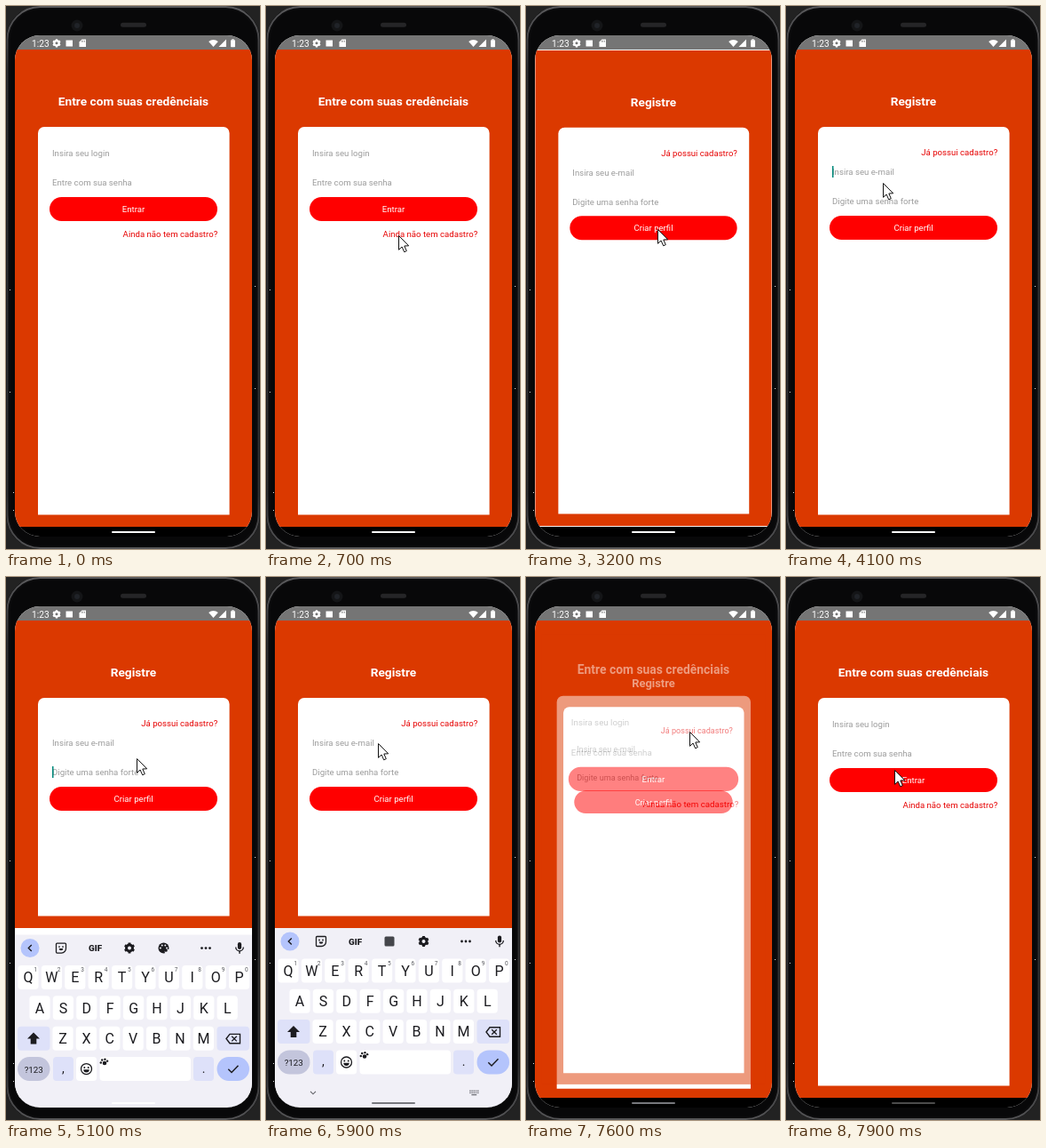
An HTML page with a canvas that plays this animation: 286 px wide and 611 px high, repeating every 8000 ms.

```html
<!DOCTYPE html>
<html lang="pt-BR">
<head>
<meta charset="utf-8">
<title>Login e cadastro</title>
<style>
html, body { margin: 0; width: 100%; height: 100%; overflow: hidden; background: #222; }
canvas { display: block; width: 286px; height: 611px; }
</style>
</head>
<body>
<canvas id="stage"></canvas>
<script>
const W = 286, H = 611, LOOP = 8000, STEP = 100;
const FONT = 'Roboto, "Open Sans", sans-serif';
const ORANGE = '#db3900', RED = '#ff0000', LINK = '#e60000', INK = '#1c1c20';
const BLUE = '#b4c4fc', LILAC = '#dee1f9', KEYBOARD = '#f1f0f7';
const SCREEN = { x: 10, y: 33, w: 267, h: 564, r: 28 };
const TOP = 49, BOTTOM = 586, IME_TOP = 395;
const CX = SCREEN.x + SCREEN.w / 2, CY = (TOP + BOTTOM) / 2;
const dpr = window.devicePixelRatio || 1;

function surface(el) {
  el.width = Math.round(W * dpr);
  el.height = Math.round(H * dpr);
  const c = el.getContext('2d');
  c.scale(dpr, dpr);
  return c;
}
const main = surface(document.getElementById('stage'));
const layerEl = document.createElement('canvas');
const layer = surface(layerEl);
let g = main;

const clamp = v => Math.max(0, Math.min(1, v));
const mix = (a, b, u) => a + (b - a) * u;
const easeOut = u => 1 - (1 - clamp(u)) ** 2;
const smooth = u => u * u * (3 - 2 * u);

function fill(color) { g.fillStyle = color; g.fill(); }
function stroke(color, width) { g.strokeStyle = color; g.lineWidth = width; g.stroke(); }
function rect(x, y, w, h, color) { g.fillStyle = color; g.fillRect(x, y, w, h); }
function box(x, y, w, h, r) { g.beginPath(); g.roundRect(x, y, w, h, r); }
function round(x, y, w, h, r, color) { box(x, y, w, h, r); fill(color); }
function arc(x, y, r, a = 0, b = Math.PI * 2) { g.beginPath(); g.arc(x, y, r, a, b); }
function dot(x, y, r, color) { arc(x, y, r); fill(color); }
function trace(...pts) {
  g.beginPath();
  for (let i = 0; i < pts.length; i += 2) g.lineTo(pts[i], pts[i + 1]);
}
function text(s, x, y, size, color, align = 'left', weight = 400) {
  g.font = `${weight} ${size}px ${FONT}`;
  g.textAlign = align;
  g.fillStyle = color;
  g.fillText(s, x, y);
}
// Calls fn with n points spread along an arc.
function fan(n, x, y, r, from, to, fn) {
  for (let i = 0; i < n; i++) {
    const a = mix(from, to, i / (n - 1));
    fn(x + r * Math.cos(a), y + r * Math.sin(a));
  }
}

function gear(x, y, r, color) {
  arc(x, y, r * .58);
  stroke(color, r * .5);
  g.save();
  g.translate(x, y);
  for (let i = 0; i < 6; i++) {
    g.rotate(Math.PI / 3);
    rect(-r * .24, -r, r * .48, r * .4, color);
  }
  g.restore();
}

function phone() {
  rect(0, 0, W, H, '#222');
  const rim = g.createLinearGradient(0, 0, 0, H);
  rim.addColorStop(0, '#5a5a5c');
  rim.addColorStop(.12, '#303032');
  rim.addColorStop(.9, '#303032');
  rim.addColorStop(1, '#555557');
  round(0, 0, W, H, 38, '#0b0b0c');
  box(1.5, 1, W - 3, H - 2, 37);
  stroke(rim, 2);
  round(5, 4, W - 10, H - 8, 34, '#080809');
  round(129, 18.7, 29, 5, 2.5, '#252527');
  dot(80, 22, 6.5, '#141517');
  dot(80, 22, 3, '#202328');
  for (const y of [319, 434, 547, 567]) {
    const x = y > 500 ? 8 : 4;
    rect(x, y, 1, 1, '#ddd');
    rect(284 - x, y - 4, 1, 1, '#ddd');
  }
}

function statusBar() {
  rect(SCREEN.x, SCREEN.y, SCREEN.w, TOP - SCREEN.y, '#757575');
  text('1:23', 29, 45.5, 10.2, '#fff');
  gear(57, 41.8, 4.6, '#fff');
  rect(67.5, 38.5, 7.5, 7, '#fff');
  trace(85.5, 37.5, 90, 37.5, 90, 46, 82.5, 46, 82.5, 40.5);
  fill('#fff');
  for (let i = 0; i < 3; i++) rect(84.9 + i * 1.6, 38.8, .7, 1.8, '#757575');
  arc(233.5, 46, 8, Math.PI * 1.27, Math.PI * 1.73);
  g.lineTo(233.5, 46);
  fill('#fff');
  trace(248, 37.5, 248, 46, 239.5, 46);
  fill('#fff');
  round(253, 38.3, 5, 8, .8, '#fff');
  rect(254.3, 37.3, 2.4, 1.2, '#fff');
}

const PAGES = {
  login: {
    title: 'Entre com suas credênciais', fields: ['Insira seu login', 'Entre com sua senha'],
    button: 'Entrar', link: 'Ainda não tem cadastro?', linkY: 260, shift: 0
  },
  signup: {
    title: 'Registre', fields: ['Insira seu e-mail', 'Digite uma senha forte'],
    button: 'Criar perfil', link: 'Já possui cadastro?', linkY: 168, shift: 21.3
  }
};

function page(name, bottom = BOTTOM, caret = -1) {
  const p = PAGES[name], buttonY = Math.floor(215 + p.shift);
  rect(SCREEN.x, TOP, SCREEN.w, bottom - TOP, ORANGE);
  text(p.title, CX, 112, 13.7, '#fff', 'center', 700);
  round(36, 136, 215.6, bottom - 13.5 - 136, [7, 7, 0, 0], '#fff');
  p.fields.forEach((label, i) => {
    const y = 169 + p.shift + 33 * i;
    text(label, 52, y, 9.65, '#9c9c9c');
    if (i === caret) rect(52, y - 10.3, 1.5, 13, '#00897b');
  });
  text(p.link, 238.2, p.linkY, 9.62, LINK, 'right');
  round(49, buttonY, 189, 27, 13.5, RED);
  text(p.button, CX, buttonY + 17, 9.62, '#fff', 'center');
}

// Draws a page as one flat layer, scaled about the screen centre.
function placed(name, scale, alpha = 1) {
  g = layer;
  g.clearRect(0, 0, W, H);
  g.save();
  g.translate(CX, CY);
  g.scale(scale, scale);
  g.translate(-CX, -CY);
  page(name);
  g.restore();
  g = main;
  g.save();
  box(SCREEN.x, TOP, SCREEN.w, BOTTOM - TOP, 0);
  g.clip();
  g.globalAlpha = clamp(alpha);
  g.drawImage(layerEl, 0, 0, W, H);
  g.restore();
}

// Focused field, or -1 while the caret blinks off.
function caretAt(t) {
  if (t < 4000 || t >= 7300) return -1;
  const focus = t < 5000 ? 4000 : t < 6100 ? 5000 : 6100;
  if ((t - focus) % 1000 >= 500) return -1;
  return focus === 5000 ? 1 : 0;
}

function content(t) {
  if (t < 2800 || t >= 7900) {
    page('login');
  } else if (t < 3300) {
    const p = easeOut((t - 2700) / 590);
    if (t < 3200) placed('login', 1 + .075 * p);
    placed('signup', .85 + .15 * p, p * 2 - .4);
  } else if (t < 7400) {
    page('signup', t < 5000 ? BOTTOM : IME_TOP, caretAt(t));
  } else {
    const p = easeOut((t - 7300) / 600);
    placed('login', 1 + .05 * (1 - p));
    placed('signup', 1 - .075 * p, (.92 - p) * 3);
  }
}

function palette(x, y) {
  dot(x, y, 6, INK);
  dot(x + 4, y + 4, 2.8, KEYBOARD);
  dot(x + 2.6, y + 2.6, 1.6, INK);
  fan(4, x, y, 3.6, -Math.PI, 0, (px, py) => dot(px, py, 1, KEYBOARD));
}

function mic(x, y) {
  round(x - 2.1, y - 6.5, 4.2, 8, 2.1, INK);
  arc(x, y - 1, 4.3, 0, Math.PI);
  stroke(INK, 1.3);
  rect(x - .7, y + 3, 1.4, 3.3, INK);
}

function toolbar(t) {
  const y = IME_TOP + 15, slot = i => 62 + 38.5 * i;
  dot(27, y, 10.5, BLUE);
  trace(28.8, y - 3.5, 25.3, y, 28.8, y + 3.5);
  stroke(INK, 1.4);
  box(slot(0) - 5.5, y - 5.5, 11, 11, [1, 1, 5, 1]);
  stroke(INK, 1.3);
  for (const dx of [-2, 2]) dot(slot(0) + dx, y - 1.5, .9, INK);
  arc(slot(0), y + .5, 2.3, 0, Math.PI);
  fill(INK);
  text('GIF', slot(1), y + 3.6, 9.8, INK, 'center', 900);
  if (t < 5500) {
    gear(slot(2), y, 6, INK);
    palette(slot(3), y);
  } else {
    round(slot(2) - 5.5, y - 5.5, 11, 11, 1.5, '#45464b');
    gear(slot(3), y, 6, INK);
  }
  for (let i = -1; i < 2; i++) dot(225 + i * 4.5, y, 1.4, INK);
  mic(263, y);
}

const rowY = i => 429.5 + 34.3 * i;

function key(x, row, w, color = '#fff', r = 4, label = '', size = 14) {
  round(x, rowY(row), w, 27, r, color);
  text(label, x + w / 2, rowY(row) + 18, size, INK, 'center');
}

function letterRow(chars, row, x0) {
  [...chars].forEach((ch, i) => {
    const x = x0 + i * 26.4;
    key(x - 11.6, row, 23.2);
    text(ch, x, rowY(row) + 19.3, 16, INK, 'center');
    if (row === 0) text((i + 1) % 10, x + 8.3, rowY(0) + 7, 6.5, '#55565c', 'center');
  });
}

function shiftIcon(x, y) {
  trace(x - 7, y, x, y - 7, x + 7, y);
  fill(INK);
  rect(x - 3.3, y - .5, 6.6, 6.5, INK);
}

function eraseIcon(x, y) {
  trace(x - 9, y, x - 5, y - 5.2, x + 6.5, y - 5.2, x + 6.5, y + 5.2, x - 5, y + 5.2);
  g.closePath();
  stroke(INK, 1.4);
  for (const d of [-2.8, 2.8]) {
    trace(x - 2.8, y - d, x + 2.8, y + d);
    stroke(INK, 1.3);
  }
}

function smiley(x, y) {
  arc(x, y, 6);
  stroke(INK, 1.3);
  for (const dx of [-2.2, 2.2]) dot(x + dx, y - 1.6, 1, INK);
  arc(x, y + .8, 3.2, 0, Math.PI);
  fill(INK);
}

function paw(x, y) {
  dot(x + .3, y + .5, 2.3, INK);
  fan(4, x, y, 3.9, -Math.PI, -.5, (px, py) => dot(px, py, 1.2, INK));
}

function keyboard(t, shift) {
  g.save();
  g.translate(0, shift);
  rect(SCREEN.x, IME_TOP, SCREEN.w, 210, KEYBOARD);
  toolbar(t);
  letterRow('QWERTYUIOP', 0, 25);
  letterRow('ASDFGHJKL', 1, 38);
  letterRow('ZXCVBNM', 2, 64);
  key(13, 2, 36.5, LILAC);
  shiftIcon(31, 512);
  key(237.5, 2, 36.5, LILAC);
  eraseIcon(257, 512);
  key(13, 3, 36.5, '#c3c5dc', 13.5, '?123', 9.8);
  key(53, 3, 23, LILAC, 4, ',');
  key(79, 3, 23.2);
  smiley(90.5, 546);
  key(105.5, 3, 102.5);
  paw(110.7, 539);
  key(211, 3, 23, LILAC, 4, '.');
  key(237.5, 3, 36.5, BLUE, 13.5);
  trace(250.3, 546.3, 254, 550, 261.5, 542.3);
  stroke(INK, 1.5);
  g.restore();
}

function imeButtons() {
  trace(50, 578.8, 53, 581.8, 56, 578.8);
  stroke('#606167', 1.1);
  for (let i = 0; i < 10; i++)
    rect(229.2 + (i % 5) * 2.2, 577.5 + Math.floor(i / 5) * 2.2, 1.4, 1.4, '#707178');
  rect(231.4, 582, 5.8, 1.3, '#707178');
}

// How far the keyboard is pushed down: slides in at 5 s, out at 7.4 s.
function keyboardShift(t) {
  const hidden = t < 6000 ? 1 - (t - 4950) / 200 : (t - 7300) / 200;
  return 210 * clamp(hidden) ** 2.4;
}

// Pointer moves: start, end, x, y
const MOVES = [
  [0, 700, 149, 258], [1300, 1500, 146, 234], [1800, 2100, 136, 211], [2200, 2600, 148, 251],
  [3200, 3700, 98, 184], [3800, 4100, 109, 199], [4700, 5100, 147, 204], [5100, 6100, 124, 185],
  [6100, 6600, 173, 242], [6600, 7000, 210, 220], [7000, 7300, 196, 166], [7500, 7900, 122, 217]
];

function pointer(t) {
  if (t === 0) return;
  let x = 160, y = -5;
  for (const [from, to, tx, ty] of MOVES) {
    const u = smooth(clamp((t - from) / (to - from)));
    x = mix(x, tx, u);
    y = mix(y, ty, u);
  }
  g.save();
  g.translate(Math.round(x) + .5, Math.round(y) + .5);
  trace(0, 0, 0, 15.8, 3.6, 12.5, 6.2, 18.3, 8.8, 17.1, 6.3, 11.5, 11.2, 11.3);
  g.closePath();
  fill('#fff');
  stroke('#111', 1);
  g.restore();
}

function draw(t) {
  phone();
  g.save();
  box(SCREEN.x, SCREEN.y, SCREEN.w, SCREEN.h, SCREEN.r);
  g.clip();
  rect(SCREEN.x, SCREEN.y, SCREEN.w, SCREEN.h, '#fff');
  content(t);
  statusBar();
  rect(SCREEN.x, BOTTOM, SCREEN.w, 12, '#000');
  const shift = keyboardShift(t);
  if (shift < 200) keyboard(t, shift);
  if (t >= 5200 && t < 7400) imeButtons();
  round(119, 591, 49, 2, 1, t < 5200 ? '#fff' : t < 7900 ? '#77787d' : '#4c4c4c');
  g.restore();
  pointer(t);
}

const start = performance.now();
function tick() {
  const t = (performance.now() - start) % LOOP;
  draw(Math.floor(t / STEP) * STEP);
  requestAnimationFrame(tick);
}
tick();
</script>
</body>
</html>
```
